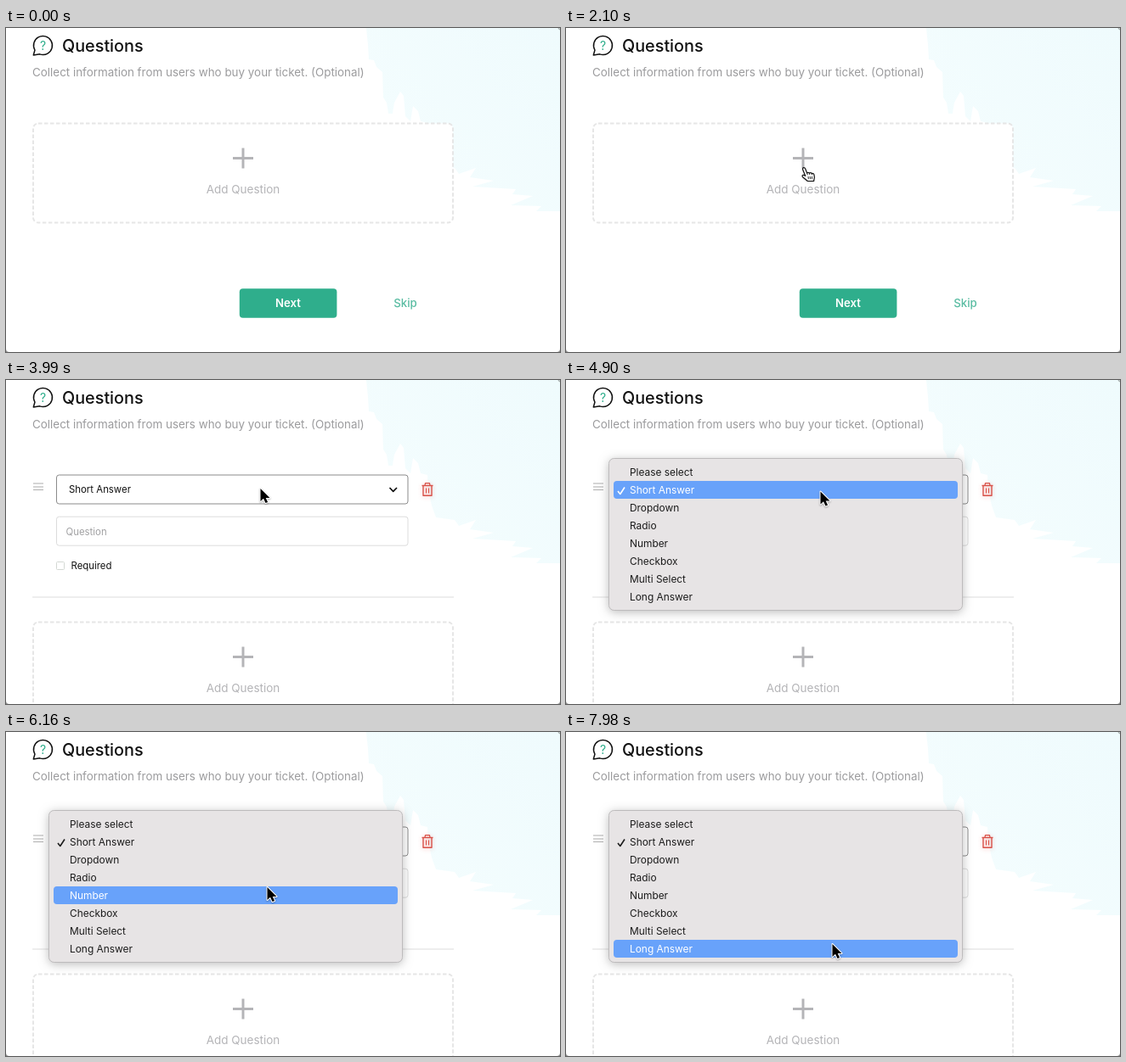
Recreate the animation shown at these times as an HTML page with a canvas. Size 652 px wide and 382 px high, loop 8000 ms.

```html
<!DOCTYPE html>
<html lang="en">
<head>
<meta charset="utf-8">
<title>Questions</title>
<style>
html, body { margin: 0; width: 100%; height: 100%; overflow: hidden; background: #fff; }
canvas { display: block; }
</style>
</head>
<body>
<canvas id="stage" width="652" height="382"></canvas>
<script>
const W = 652, H = 382, LOOP = 8000, STEP = 70;
const FORM_AT = 3010, MOVE_AT = 3360, MENU_AT = 4060, ENTER_AT = 420;
const GREY = '#b4b4b7';
const OPTIONS = ['Please select', 'Short Answer', 'Dropdown', 'Radio',
  'Number', 'Checkbox', 'Multi Select', 'Long Answer'];
const ROW = 21, MENU_TOP = 98;

// Pointer path: time, x, y
const PATH = [
  [350, 315, 392], [770, 306, 270], [1190, 294.5, 182], [1400, 286.5, 168],
  [1540, 284.5, 167], [1680, 283.5, 166], [1960, 283.5, 166], [2100, 282, 165],
  [3290, 282, 165], [3640, 291, 144], [3990, 299.5, 128], [4130, 299.5, 128],
  [4200, 299.5, 129], [4830, 299.5, 129], [4900, 299.5, 131.5], [5670, 305, 165],
  [6160, 307.5, 183], [6510, 309, 197], [6860, 310.5, 211], [7350, 312, 228],
  [7980, 313.5, 250]
];

const HAND = new Path2D('M-3.4 1.8Q-3.8 0 -2.2 -.3Q-.8 -.4 -.2 1.2L1.6 6' +
  'Q3 4.8 4.4 6Q6 5 7.2 6.4Q9.4 6 10 8Q11 11 9.6 15.5H2.4Q0 13.5 -2.8 11.3' +
  'Q-4.6 9.6 -3.6 8.6Q-2.3 7.8 -.2 9.4Z');
const HAND_LINES = new Path2D('M3 10L3.4 13.2M5.2 10L5.5 13.2M7.4 10V13.2M1.6 6L2.3 8.3M4.4 6L4.8 8M7.2 6.4L7.5 8.2');
const ARROW = new Path2D('M0 0V15L3.5 11.8L6 17L8.6 16L6.2 10.9H11Z');
const GLOW = new Path2D('M424 0L426 20L427 37L433 38L436 46L443 52L444 82L448 88' +
  'L450 101L455 101L457 88L464 75L468 80L470 104L476 110L479 92L485 98L488 110' +
  'L496 112L497 130L501 148L506 162L528 165L533 172L553 165L546 176L574 180L549 187' +
  'L600 190L596 196L620 198L594 209L630 210L624 216H652V0Z');

const g = document.getElementById('stage').getContext('2d');

function text(str, x, y, size, color, weight = 400, align = 'left') {
  g.font = `${weight} ${size}px Inter, "Open Sans", sans-serif`;
  g.fillStyle = color;
  g.textAlign = align;
  g.fillText(str, x, y);
}

function box(x, y, w, h, r, fill, stroke, width = 1) {
  g.beginPath();
  g.roundRect(x, y, w, h, r);
  if (fill) { g.fillStyle = fill; g.fill(); }
  if (stroke) { g.strokeStyle = stroke; g.lineWidth = width; g.stroke(); }
}

function line(points, color, width) {
  g.beginPath();
  points.forEach(([x, y], i) => i ? g.lineTo(x, y) : g.moveTo(x, y));
  g.strokeStyle = color;
  g.lineWidth = width;
  g.stroke();
}

function shadow(color, blur, dy) {
  g.shadowColor = color;
  g.shadowBlur = blur;
  g.shadowOffsetY = dy;
}

function drawPage() {
  g.fillStyle = '#8d8d8d';
  g.fillRect(0, 0, W, H);
  box(0, -6, W, H + 6, 4, '#fff');
  const tint = g.createLinearGradient(440, 170, 652, 0);
  tint.addColorStop(0, '#f4fdfe');
  tint.addColorStop(1, '#effbfd');
  g.fillStyle = tint;
  g.fill(GLOW);
  line([[650, 0], [652, 2]], '#a5acac', 1.5);
}

function drawHeading() {
  g.beginPath();
  g.arc(43.5, 20.5, 11, Math.PI * 5 / 6, Math.PI * 2.61);
  g.lineTo(32.3, 32);
  g.closePath();
  g.strokeStyle = '#111';
  g.lineWidth = 1.5;
  g.lineJoin = 'round';
  g.stroke();
  text('?', 43.5, 25.7, 14, '#2fae8c', 400, 'center');
  text('Questions', 66, 28, 19.8, '#111', 500);
  text('Collect information from users who buy your ticket. (Optional)', 31, 57, 13.41, '#9b9b9d');
}

function drawAddCard(dy) {
  g.save();
  g.translate(0, dy);
  g.setLineDash([4.5, 2.5]);
  box(32, 112.5, 494, 117, 6, '#fff', '#e6e6e6', 2);
  g.setLineDash([]);
  line([[267, 153.5], [291, 153.5]], GREY, 3);
  line([[279, 141.5], [279, 165.5]], GREY, 3);
  text('Add Question', 279, 195, 13.5, GREY, 400, 'center');
  g.restore();
}

function drawButtons() {
  box(274.8, 307.2, 114.6, 34.6, 4, '#2fae8c');
  text('Next', 332, 329, 13.2, '#fff', 600, 'center');
  text('Skip', 470, 329, 13.3, '#59bca2', 500, 'center');
}

function drawTrash() {
  g.save();
  shadow('rgba(230, 80, 70, .35)', 5, 1);
  const red = '#d9534a';
  line([[489.5, 124.5], [502.5, 124.5]], red, 1.4);
  line([[493, 124], [493.6, 121.7], [498.4, 121.7], [499, 124]], red, 1.3);
  line([[491, 125], [491, 136.3], [501, 136.3], [501, 125]], red, 1.4);
  line([[494.5, 127.5], [494.5, 133.5]], red, 1.2);
  line([[497.5, 127.5], [497.5, 133.5]], red, 1.2);
  g.restore();
}

function drawForm() {
  for (const y of [122, 126, 129.5]) line([[32, y], [44, y]], '#b2b2b2', 1.1);
  box(59.5, 112, 413.5, 34, 3, '#fff', '#8b8b8b');
  text('Short Answer', 74, 133, 11.4, '#111');
  line([[451.5, 127], [455.7, 131.3], [460, 127]], '#111', 1.7);
  drawTrash();
  box(59.5, 161.2, 413.5, 34, 3, '#fff', '#dcdcdc');
  text('Question', 70.5, 183, 11.4, '#a0a0a2');
  box(59.5, 214.5, 9, 9, 1, '#fff', '#d3d8d3');
  text('Required', 76.5, 223, 11.4, '#111');
  line([[31, 256], [527, 256]], '#e8e8e8', 1.4);
}

function drawMenu(pointerY) {
  g.save();
  shadow('rgba(0, 0, 0, .28)', 12, 2);
  box(50.5, 92.5, 416, 179, 6, '#e7e4e5');
  g.restore();
  box(50.5, 92.5, 416, 179, 6, null, '#bdbbbc');
  const active = Math.floor((pointerY - MENU_TOP) / ROW);
  box(56, MENU_TOP + active * ROW, 405, ROW, 4, '#68a2fa');
  OPTIONS.forEach((name, i) => {
    const y = MENU_TOP + i * ROW;
    const color = i === active ? '#fff' : '#1c1c1c';
    text(name, 75, y + 15.2, 11.9, color);
    if (i === 1) line([[61, y + 12], [63.8, y + 15.5], [69, y + 7.5]], color, 1.6);
  });
}

function pointerAt(t) {
  const i = PATH.findIndex(p => p[0] > t);
  if (i < 0) return PATH[PATH.length - 1].slice(1);
  const [t0, x0, y0] = PATH[i - 1], [t1, x1, y1] = PATH[i];
  const k = (t - t0) / (t1 - t0);
  return [x0 + (x1 - x0) * k, y0 + (y1 - y0) * k];
}

function drawPointer(t, x, y) {
  const overButton = y > 307 && y < 342;
  const hand = t < MOVE_AT && (overButton || y < 230);
  g.save();
  g.translate(x, y);
  g.lineJoin = 'round';
  shadow('rgba(0, 0, 0, .3)', 2, 1);
  if (hand) {
    g.fillStyle = '#fff';
    g.fill(HAND);
    shadow('transparent', 0, 0);
    g.strokeStyle = '#151515';
    g.lineWidth = 1.2;
    g.stroke(HAND);
    g.lineWidth = .9;
    g.stroke(HAND_LINES);
  } else {
    g.strokeStyle = '#fff';
    g.lineWidth = 2;
    g.stroke(ARROW);
    shadow('transparent', 0, 0);
    g.fillStyle = '#000';
    g.fill(ARROW);
  }
  g.restore();
}

function draw(now) {
  const t = Math.floor(now % LOOP / STEP) * STEP;
  const form = t >= FORM_AT;
  drawPage();
  drawHeading();
  drawAddCard(form ? 173 : 0);
  if (form) drawForm();
  else drawButtons();
  if (t >= ENTER_AT) {
    const [x, y] = pointerAt(t);
    if (t >= MENU_AT) drawMenu(y);
    drawPointer(t, x, y);
  }
}

const start = performance.now();
function tick() {
  draw(performance.now() - start);
  requestAnimationFrame(tick);
}
tick();
</script>
</body>
</html>
```
